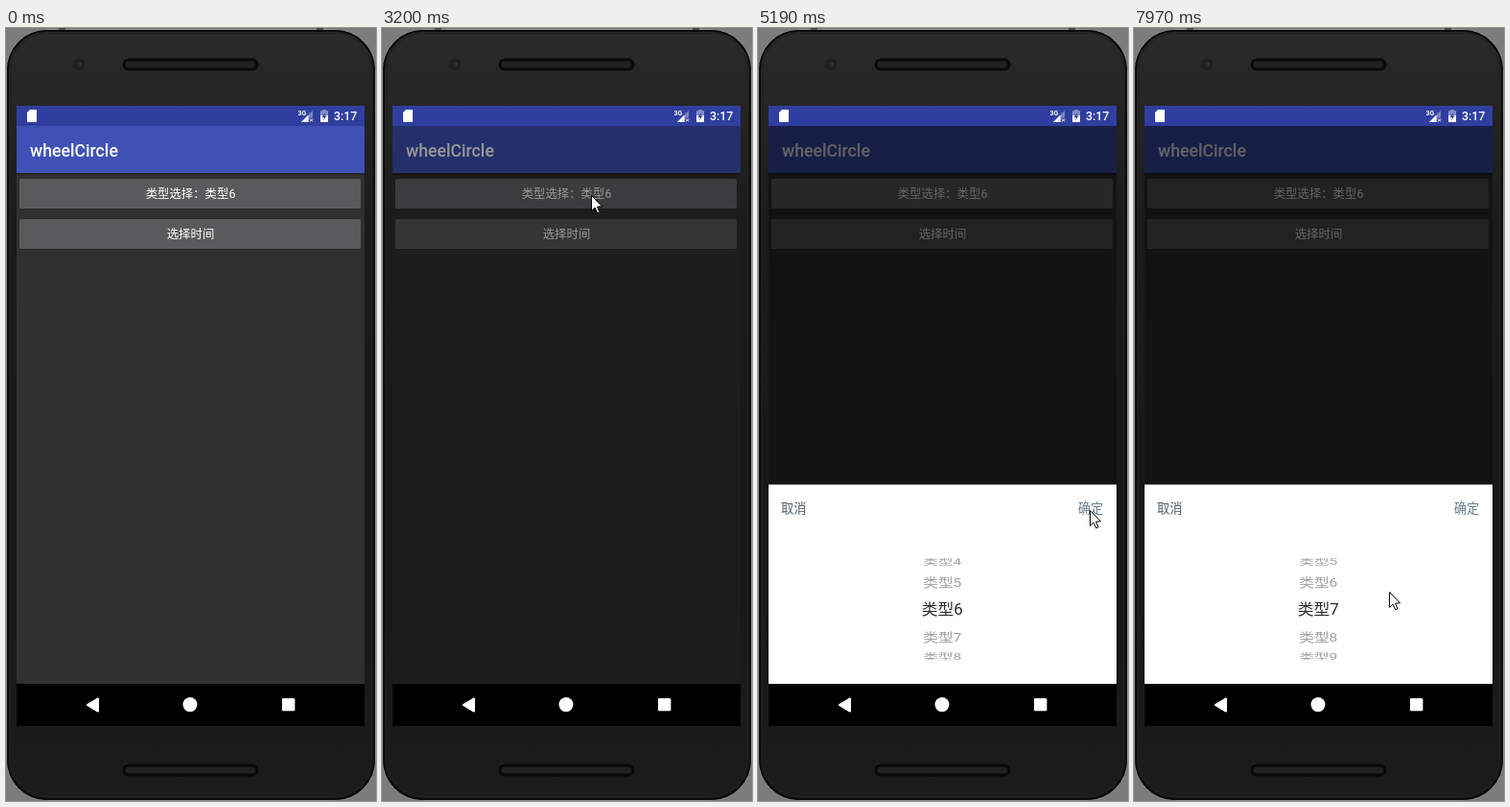
Recreate the animation shown at these times as an HTML page with a canvas. Size 386 px wide and 805 px high, loop 8 s.

```html
<!DOCTYPE html>
<html lang="zh-CN">
<head>
<meta charset="utf-8">
<style>
html, body { margin: 0; width: 100%; height: 100%; overflow: hidden; background: #7c7c7c; }
canvas { display: block; width: 386px; height: 805px; }
</style>
</head>
<body>
<canvas id="stage" width="386" height="805"></canvas>
<script>
const ctx = document.getElementById('stage').getContext('2d');
const LOOP = 8000, TICK = 75;
const FONT = 'Roboto, "Noto Sans CJK SC", "Noto Sans CJK", sans-serif';

// Progress from 0 to 1, advancing in ticks from t0 and complete at t1.
function ramp(t, t0, t1) {
  if (t < t0) return 0;
  const steps = Math.round((t1 - t0) / TICK) + 1;
  return Math.min(1, (Math.floor((t - t0) / TICK) + 1) / steps);
}

// Straight mouse strokes: start, end, and the point reached.
const strokes = [
  { from: 465, to: 540, x: 214, y: 245 },
  { from: 860, to: 1240, x: 218, y: 181 },
  { from: 1720, to: 1720, x: 218, y: 174 },
  { from: 3270, to: 3350, x: 83, y: 224 },
  { from: 3740, to: 4040, x: 237, y: 622 },
  { from: 4200, to: 4350, x: 219, y: 587 },
  { from: 4430, to: 4890, x: 330, y: 508 },
  { from: 5190, to: 5270, x: 361, y: 495 },
  { from: 5970, to: 6130, x: 229, y: 587 },
  { from: 6360, to: 6510, x: 200, y: 616 },
  { from: 6830, to: 7290, x: 194, y: 570 },
  { from: 7440, to: 7970, x: 266, y: 587 }
];

function mouseAt(t) {
  let x = 265, y = 508;
  for (const s of strokes) {
    const p = ramp(t, s.from, s.to);
    x += (s.x - x) * p;
    y += (s.y - y) * p;
  }
  return [Math.round(x), Math.round(y)];
}

function paint(fill, stroke, width = 1) {
  if (fill) { ctx.fillStyle = fill; ctx.fill(); }
  if (stroke) { ctx.strokeStyle = stroke; ctx.lineWidth = width; ctx.stroke(); }
}

function rect(x, y, w, h, fill) {
  ctx.fillStyle = fill;
  ctx.fillRect(x, y, w, h);
}

function round(x, y, w, h, r, ...style) {
  ctx.beginPath();
  ctx.roundRect(x, y, w, h, r);
  paint(...style);
}

function shape(path, ...style) {
  const p = new Path2D(path);
  const [fill, stroke, width = 1] = style;
  ctx.lineJoin = 'round';
  if (fill) { ctx.fillStyle = fill; ctx.fill(p); }
  if (stroke) { ctx.strokeStyle = stroke; ctx.lineWidth = width; ctx.stroke(p); }
}

function disc(x, y, r, fill) {
  ctx.beginPath();
  ctx.arc(x, y, r, 0, 7);
  paint(fill);
}

function text(str, x, y, size, color, align = 'left', weight = 400) {
  ctx.font = `${weight} ${size}px ${FONT}`;
  ctx.textAlign = align;
  ctx.fillStyle = color;
  ctx.fillText(str, x, y);
}

function clipped(x, y, w, h, draw) {
  ctx.save();
  ctx.beginPath();
  ctx.rect(x, y, w, h);
  ctx.clip();
  draw();
  ctx.restore();
}

function vertical(y0, y1, ...colors) {
  const g = ctx.createLinearGradient(0, y0, 0, y1);
  colors.forEach((c, i) => g.addColorStop(i / (colors.length - 1), c));
  return g;
}

function speaker(y) {
  round(122.5, y + 0.5, 140, 11, 5.5, '#101010', '#080808', 2);
  round(125, y + 3, 135, 6, 3, '#212121');
}

function phone() {
  rect(0, 0, 386, 805, '#7c7c7c');
  round(0.5, 1.5, 385, 803, 42, vertical(0, 805, '#2b2b2b', '#1b1b1b', '#181818', '#181818', '#1c1c1c'), '#8c8c8c');
  round(2, 3, 382, 800, 41, null, '#0b0b0b', 2);
  round(4.5, 5.5, 377, 795, 39, null, '#222');
  for (const x of [55, 324]) rect(x, 0, 7, 2, '#4c4c4c');
  for (const y of [32, 767]) speaker(y);
  disc(76, 38, 6, '#1f1f1f');
  disc(77, 38, 3, '#2a2c2e');
}

function statusBar() {
  rect(11, 81, 363, 21, '#303f9f');
  shape('M25 85h6q1 0 1 1v11q0 1-1 1h-8q-1 0-1-1v-9z', '#fff');
  text('3G', 304.5, 90.5, 7, '#fff', 'left', 700);
  shape('M320 86v12h-12z', '#7b86c4');
  shape('M315.5 90.5v7.5h-7.5z', '#fff');
  rect(316, 93.5, 5, 5, '#303f9f');
  shape('M317 94.5l3 3m0-3l-3 3', null, '#fff');
  rect(330.3, 85, 3.4, 2, '#838dc7');
  round(328, 86, 8, 12, 1, '#838dc7');
  rect(328, 91, 8, 7, '#fff');
  shape('M332.8 88l-3.2 4.8h2l-.4 3.5 3.3-5h-2.1z', '#303f9f');
  text('3:17', 342, 96, 12.4, '#fff', 'left', 500);
}

function button(y, label, fill) {
  round(14, y + 1, 356, 31, 2, 'rgba(0,0,0,.15)');
  round(14, y, 356, 31, 1.5, fill);
  text(label, 192.5, y + 20.3, 12.4, '#fff', 'center');
}

function app(t) {
  const pressed = t >= 3030 && t < 6980;
  rect(11, 102, 363, 581, '#303030');
  rect(11, 102, 363, 49, '#3f51b5');
  rect(11, 151, 363, 3, vertical(151, 154, 'rgba(0,0,0,.3)', 'rgba(0,0,0,0)'));
  text('wheelCircle', 25, 133.5, 17.7, '#fff', 'left', 500);
  button(157, '类型选择：类型6', pressed ? '#656466' : '#5a595b');
  button(199, '选择时间', '#5a595b');
  rect(11, 102, 363, 581, `rgba(0,0,0,${0.61 * ramp(t, 3110, 3270)})`);
}

function navBar() {
  rect(11, 683, 363, 44, '#000');
  shape('M84.8 705l11.2-6.6v13.2z', '#fff', '#fff', 2);
  disc(192, 704.6, 7.5, '#fff');
  round(288, 698, 13.4, 13.2, 1, '#fff');
}

function item(n, y, sx, sy, color) {
  ctx.save();
  ctx.translate(192.3, y);
  ctx.scale(sx, sy);
  text('类型' + n, 0, 5.9, 15.7, color, 'center');
  ctx.restore();
}

// Items sit on a cylinder: dark inside the middle band, grey outside it.
function wheel(pos) {
  const mid = 605.3, radius = 57.4, angle = 0.518, band = 16;
  const edge = 53 + 4 * Math.abs(Math.sin(pos * Math.PI));
  for (let n = Math.ceil(pos - 2.6); n <= pos + 2.6; n++) {
    const a = (n - pos) * angle;
    const y = mid + radius * Math.sin(a);
    const grey = () => item(n, y, 1, 0.3 + 0.6 * Math.cos(a), '#a0a0a0');
    clipped(140, mid - edge, 105, edge - band, grey);
    clipped(140, mid + band, 105, edge - band, grey);
    clipped(140, mid - band, 105, 2 * band, () => item(n, y, 1.07, Math.cos(a), '#2a2a2a'));
  }
}

function sheet(t) {
  const drag = ramp(t, 7140, 7290), snap = ramp(t, 7440, 7740);
  ctx.translate(0, 207.5 * (1 - ramp(t, 3270, 3350)));
  rect(11, 475.5, 363, 208, '#fff');
  text('取消', 24, 505, 13.3, '#505c65', 'left', 300);
  text('确定', 360.3, 505, 13.3, '#667d8e', 'right', 300);
  wheel(6 + (drag + snap) / 2);
}

function cursor(t) {
  if (t < 390) return;
  const [x, y] = mouseAt(t);
  ctx.save();
  ctx.translate(x + 0.5, y + 0.5);
  shape('M0 0v16l3.7-3.4 2.5 5.7 2.4-1-2.5-5.7 4.9-.3z', '#fff', '#000');
  ctx.restore();
}

function frame(now) {
  const t = now % LOOP;
  phone();
  statusBar();
  app(t);
  clipped(11, 102, 363, 581, () => sheet(t));
  navBar();
  cursor(t);
  requestAnimationFrame(frame);
}
requestAnimationFrame(frame);
</script>
</body>
</html>
```
